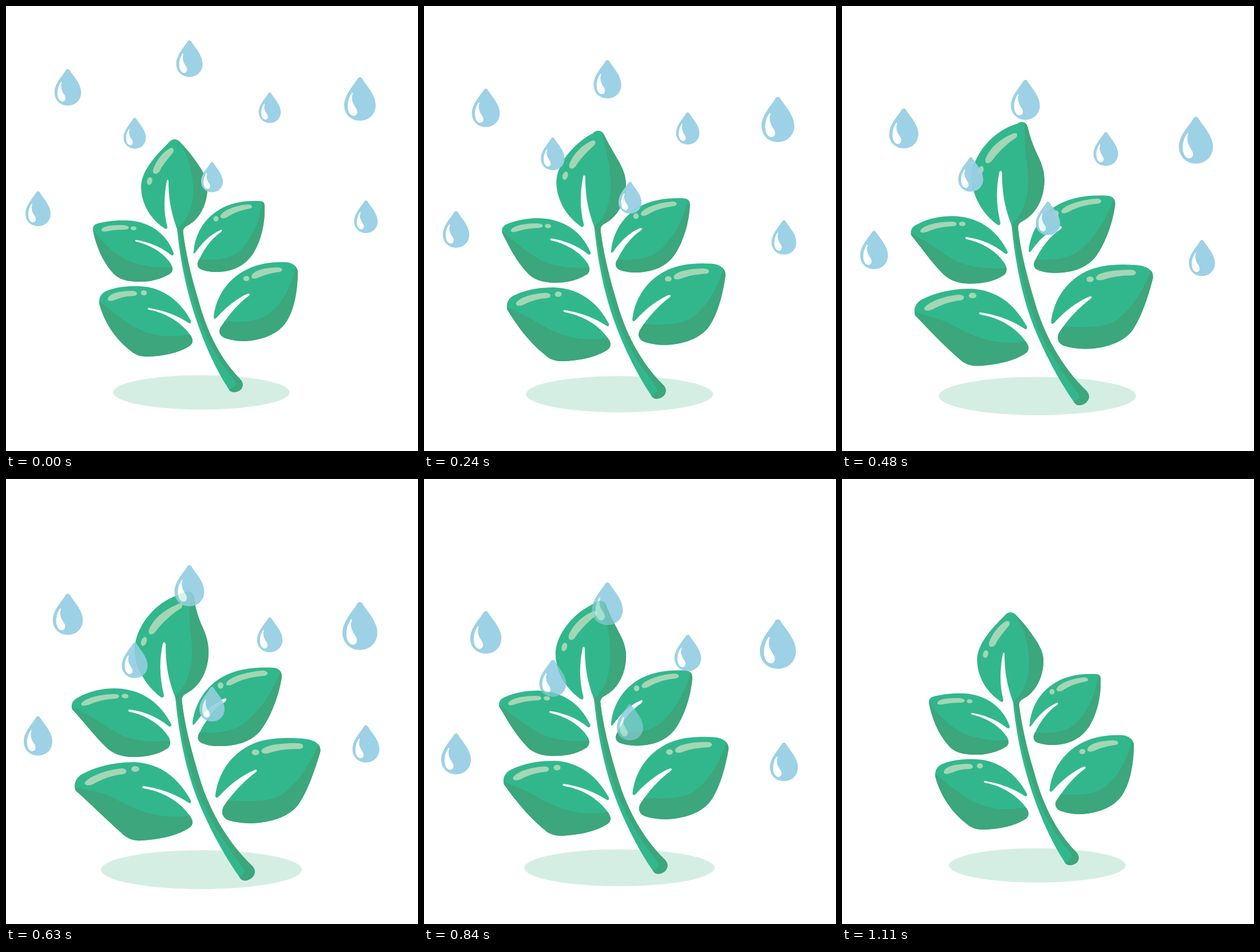
Write an HTML page that moves like this. It is 720 px wide and 778 px high and loops after 1200 ms.

```html
<!DOCTYPE html>
<html lang="en">
<head>
<meta charset="utf-8">
<title>Watered plant</title>
<style>
html, body { margin: 0; width: 100%; height: 100%; overflow: hidden; background: #fff; }
svg { display: block; width: 100%; height: 100%; }
</style>
</head>
<body>
<svg id="stage" viewBox="0 0 720 778"></svg>
<script>
const LIGHT = '#32b78d', DARK = '#3ca67c', SHINE = '#a3d6b4', GROUND = '#d5eee4', WATER = '#9dd1e6';
const STEP = 30, LAST = 1110, LOOP = 1200, PEAK = 600;

// Each part has a resting and a stretched shape with matching point order.
const stem = {
  outline: [
    'M299 390C304 440 313 485 325 525C340 575 362 628 388 668C392 677 402 677 410 671C416 664 414 657 409 652C373 615 350 567 335 510C322 468 313 425 309 392Z',
    'M296 383C301 435 310 485 323 527C338 576 372 645 408 696C412 704 421 704 430 697C437 690 436 682 430 676C385 633 353 575 336 515C322 468 311 425 307 384Z'],
  shade: [
    'M301 385C308 445 318 485 331 525C345 570 362 610 400 655C403 661 399 668 392 669L388 680L425 690L425 650L340 380Z',
    'M298 378C305 440 316 485 329 527C344 575 372 625 415 681C419 688 414 694 408 694L404 705L445 715L445 665L340 375Z']
};

const leaves = [
  { // top
    outline: [
      'M284 239C290 231 299 231 305 239C313 247 325 261 335 276C346 292 352 304 352 318C352 348 337 374 317 384C311 387 309 391 309 398L302 398C292 372 284 345 284 307C284 303 281 303 281 306C276 333 275 360 282 386C282 390 279 391 276 388C253 373 236 346 236 315C237 288 260 263 284 239Z',
      'M310 200C318 195 326 197 328 207C331 225 335 240 343 258C351 275 354 288 354 304C353 338 338 363 315 375C309 378 307 382 307 390L299 390C287 360 279 335 279 290C279 285 275 284 274 288C267 320 269 350 276 378C276 382 273 383 270 381C245 362 225 330 225 296C226 261 258 213 310 200Z'],
    shade: [
      'M301 235C317 258 327 290 327 320C327 355 314 379 300 388L300 402L370 402L370 235Z',
      'M322 195C319 235 321 260 325 290C328 335 312 366 296 380L296 394L372 394L372 195Z'],
    shine: [
      'M286 249C291 246 295 250 292 256C284 266 272 280 269 288C265 295 255 296 257 286C262 272 273 256 286 249Z',
      'M298 220C306 215 312 218 306 226C294 232 272 252 262 266C256 275 247 273 250 263C256 247 275 229 298 220Z'],
    spot: [[251, 306, 4.5, 6.8, 15], [241, 284, 4.7, 8, 20]]
  },
  { // upper left
    outline: [
      'M152 392C151 386 154 382 161 380C180 375 200 374 215 375C255 378 282 401 293 432C293 436 291 437 288 435C271 421 250 413 228 409C225 409 225 411 228 412C254 418 275 432 287 449C293 457 292 466 285 469C268 479 250 482 233 482C210 482 196 477 187 467C168 446 157 418 152 392Z',
      'M116 403C113 396 115 387 126 382C147 370 170 366 190 366C238 367 269 391 289 429C289 433 287 434 284 432C262 414 238 406 216 403C213 403 213 406 216 407C246 413 270 430 283 449C289 457 288 467 282 471C264 483 243 486 222 486C200 486 186 479 176 470C152 446 140 429 116 403Z'],
    shade: [
      'M150 388C167 411 184 430 211 444C236 455 264 459 296 456L296 495L150 495Z',
      'M111 396C142 410 167 427 190 442C218 458 252 462 292 457L292 500L111 500Z'],
    shine: [
      'M167 391C170 383 190 383 205 383C218 384 217 391 207 391C195 391 185 392 176 394C169 395 166 394 167 391Z',
      'M132 392C140 381 170 376 190 376C200 376 200 383 192 384C172 385 158 389 146 394C136 398 130 397 132 392Z'],
    spot: [[223, 388.5, 5, 3.5, 5], [208, 379.5, 6, 4, 5]]
  },
  { // lower left
    outline: [
      'M163 520C162 510 166 502 176 498C197 490 217 489 235 490C276 492 306 518 323 550C324 554 322 556 319 554C298 540 274 532 250 528C247 528 247 530 250 531C280 537 306 553 322 575C328 583 327 591 320 595C299 608 272 612 247 613C233 613 225 609 218 603C188 580 170 548 163 520Z',
      'M122 545C117 534 122 522 133 516C161 501 193 495 225 495C270 498 300 521 323 562C324 566 322 568 319 566C295 550 268 541 241 537C237 537 237 540 241 541C276 547 305 565 322 590C328 598 327 606 320 610C297 625 266 630 238 632C222 633 211 628 202 619C174 594 149 569 122 545Z'],
    shade: [
      'M161 514C179 529 195 542 214 555C247 576 282 583 330 572L330 630L161 630Z',
      'M117 538C143 544 164 546 185 556C220 575 265 600 330 587L330 645L117 645Z'],
    shine: [
      'M178 511C183 500 205 498 222 498C231 499 231 506 223 507C210 507 200 510 190 514C182 517 177 516 178 511Z',
      'M138 530C150 517 180 508 202 506C212 506 213 514 205 516C185 518 170 524 155 532C145 538 136 536 138 530Z'],
    spot: [[241, 501.5, 5.2, 4.5, 0], [226, 507, 7, 5, 0]]
  },
  { // upper right
    outline: [
      'M328 429C331 394 350 367 380 352C400 342 425 340 443 341C449 341 452 344 452 350C453 380 446 409 433 431C418 455 395 465 367 465C357 465 348 463 342 461C334 458 333 450 337 444C348 421 361 405 376 395C379 392 377 390 374 392C355 401 343 414 331 431C328 434 327 433 328 429Z',
      'M326 426C330 392 350 361 380 345C405 332 435 328 468 330C478 331 482 337 482 346C477 378 464 413 447 437C430 460 402 467 372 467C360 467 350 465 343 462C334 458 334 450 338 444C349 421 364 402 383 389C387 386 385 382 381 384C357 394 343 411 330 428C327 431 326 430 326 426Z'],
    shade: [
      'M448 335C446 370 432 405 407 429C388 444 361 446 330 442L330 480L470 480L470 335Z',
      'M482 330C467 372 443 406 415 428C393 443 363 446 330 442L330 485L500 485L500 330Z'],
    shine: [
      'M375 367C378 358 400 349 421 347C431 346 433 353 426 354C410 357 400 361 388 368C382 373 374 372 375 367Z',
      'M385 357C388 347 420 337 448 335C459 335 460 342 452 344C430 346 415 349 398 358C391 362 384 362 385 357Z'],
    spot: [[367, 372, 4.5, 4.7, 0], [375, 361, 5, 5.5, 0]]
  },
  { // lower right
    outline: [
      'M363 542C367 506 390 475 422 460C445 449 470 447 490 448C503 449 511 457 510 469C509 502 503 532 490 552C475 575 445 585 415 586C402 586 391 583 384 581C372 577 370 567 377 559C390 539 406 520 424 507C428 504 425 502 422 503C402 512 383 528 368 545C365 548 362 547 363 542Z',
      'M366 552C371 515 391 484 425 466C450 453 485 451 520 454C541 456 552 465 549 478C540 508 527 546 511 569C494 592 460 601 428 602C412 602 399 599 390 597C377 592 376 582 380 573C395 550 414 530 436 513C440 510 438 507 434 509C412 518 390 535 372 555C369 558 365 558 366 552Z'],
    shade: [
      'M509 445C500 489 484 523 452 543C432 553 408 554 365 550L365 600L530 600L530 445Z',
      'M551 452C533 495 512 532 479 554C454 565 424 564 370 561L370 615L570 615L570 452Z'],
    shine: [
      'M429 472C432 462 455 457 475 457C484 457 485 464 478 465C462 467 452 470 441 475C434 478 428 477 429 472Z',
      'M447 474C452 465 485 461 512 462C522 463 521 471 513 472C490 472 475 474 460 479C450 482 445 478 447 474Z'],
    spot: [[420, 476.5, 5.3, 4.5, 0], [436, 478, 6.5, 5, 0]]
  }
];

const ground = [[341.5, 675.5, 154.5, 30, 0], [341.5, 683, 175.5, 34, 0]];

// Tip x, tip y, width, height
const drops = [
  [320.5, 60, 46, 64], [108, 110, 46.5, 64], [225, 195.5, 39, 54], [461, 151.5, 38.5, 53],
  [618.5, 124.5, 55, 76], [360, 273, 38, 52.5], [56, 324, 44, 61], [629, 340, 41, 57]
];
const DROP = 'M-3 1.5Q0 -1.5 3 1.5C8 11 23 25 23 41C23 55 12.5 64 0 64C-12.5 64 -23 55 -23 41C-23 25 -8 11 -3 1.5Z';
const GLINT = 'M-10.5 24C-10 22.5 -11.5 22.5 -12.5 24C-20 35 -20 55 -9.5 57C-4 57 -2.5 51 -5.5 46C-10 39 -13.5 33 -10.5 24Z';

const svg = document.getElementById('stage');
const morphs = [], ovals = [];

function add(parent, tag, attrs = {}) {
  const el = document.createElementNS('http://www.w3.org/2000/svg', tag);
  for (const key in attrs) el.setAttribute(key, attrs[key]);
  return parent.appendChild(el);
}

function addMorph(parent, pair, fill) {
  const ends = pair[1].match(/[\d.]+/g).map(Number);
  morphs.push({ el: add(parent, 'path', { fill }), start: pair[0], ends });
}

function addOval(parent, pair, fill) {
  ovals.push({ el: add(parent, 'ellipse', { fill }), pair });
}

function addPart(parent, part, id) {
  addMorph(add(defs, 'clipPath', { id }), part.outline, '#000');
  addMorph(parent, part.outline, LIGHT);
  addMorph(add(parent, 'g', { 'clip-path': `url(#${id})` }), part.shade, DARK);
}

function addDrops(parent) {
  return drops.map(() => {
    const g = add(parent, 'g');
    add(g, 'path', { d: DROP, fill: WATER });
    add(g, 'path', { d: GLINT, fill: '#fff' });
    return g;
  });
}

const defs = add(svg, 'defs');
addOval(svg, ground, GROUND);
const backRain = add(svg, 'g');
const plant = add(svg, 'g');
const foliage = add(defs, 'clipPath', { id: 'foliage' });
const frontRain = add(svg, 'g', { 'clip-path': 'url(#foliage)' });

addPart(plant, stem, 'stem');
leaves.forEach((leaf, i) => {
  addPart(plant, leaf, 'leaf' + i);
  addMorph(plant, leaf.shine, SHINE);
  addOval(plant, leaf.spot, SHINE);
  addMorph(foliage, leaf.outline, '#000');
});
const dropSets = [addDrops(backRain), addDrops(frontRain)];

const mix = (a, b, k) => a + (b - a) * k;

function draw(t) {
  // The stretched shapes lie just short of the turning point.
  const k = (t < PEAK ? t / PEAK : (LAST - t) / (LAST - PEAK)) * 17 / 16;

  for (const { el, start, ends } of morphs) {
    let i = 0;
    el.setAttribute('d', start.replace(/[\d.]+/g, n => mix(+n, ends[i++], k).toFixed(2)));
  }
  for (const { el, pair: [a, b] } of ovals) {
    const [cx, cy, rx, ry, turn] = a.map((n, i) => mix(n, b[i], k));
    for (const [key, value] of Object.entries({ cx, cy, rx, ry })) el.setAttribute(key, value);
    el.setAttribute('transform', `rotate(${turn} ${cx} ${cy})`);
  }

  const grow = t / 840;
  drops.forEach(([x, y, w, h], i) => {
    const sx = (w + 8 * grow) / 46, sy = (h + 10.5 * grow) / 64;
    const place = `translate(${x} ${y + 0.1438 * t}) scale(${sx} ${sy})`;
    for (const set of dropSets) set[i].setAttribute('transform', place);
  });

  // Off the leaves a drop is either solid or gone; on them it fades.
  const fade = 1 - (t / LAST) ** 3;
  backRain.setAttribute('visibility', fade >= 0.5 ? 'visible' : 'hidden');
  for (const g of dropSets[1]) g.setAttribute('opacity', fade);
}

const begin = performance.now();
function tick() {
  const t = (performance.now() - begin) % LOOP;
  draw(Math.min(Math.floor(t / STEP) * STEP, LAST));
  requestAnimationFrame(tick);
}
tick();
</script>
</body>
</html>
```
